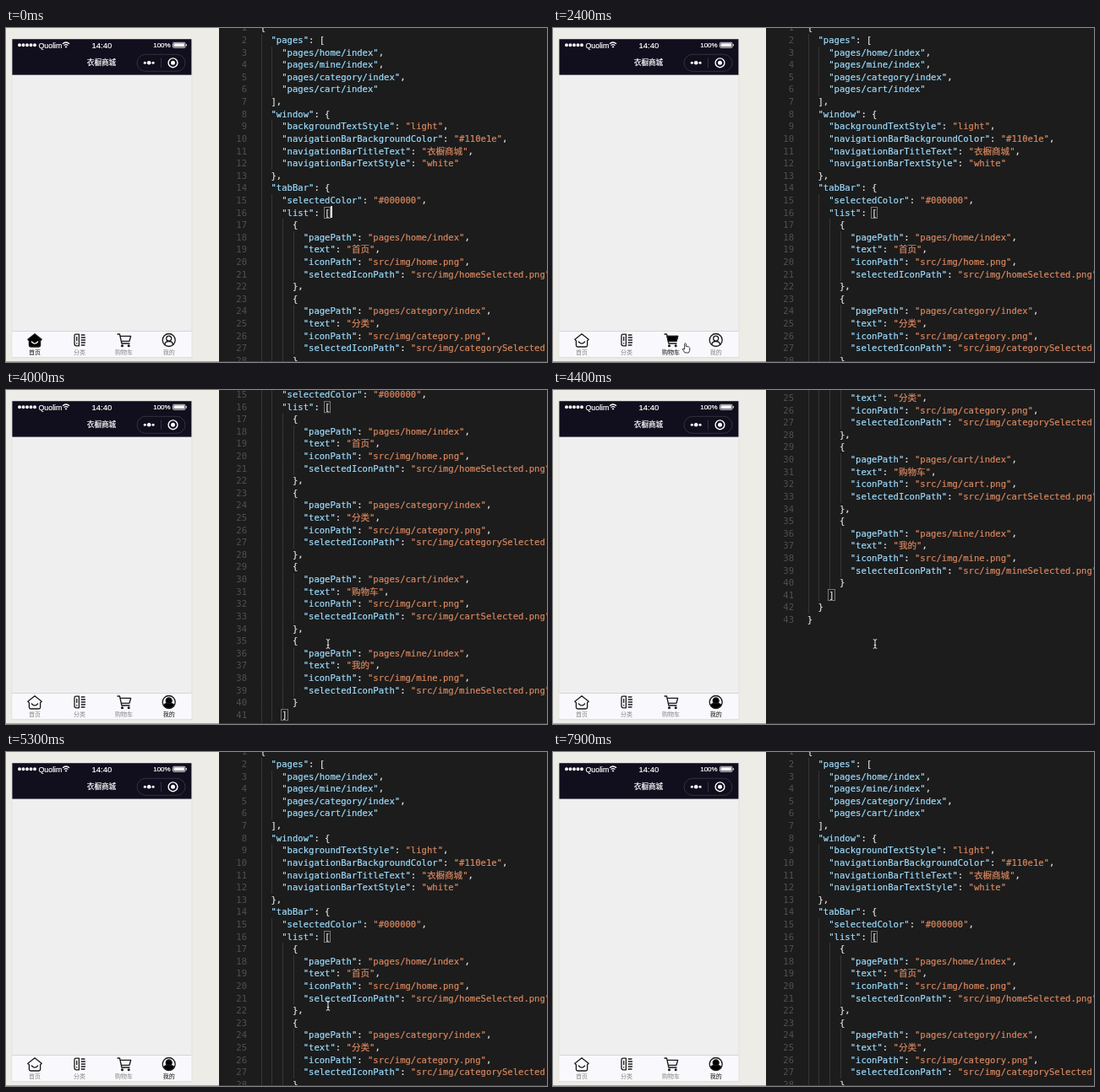
Write an HTML page that moves like this. It is 640x396 px and loops after 8000 ms.

```html
<!DOCTYPE html>
<html lang="zh">
<head>
<meta charset="utf-8">
<style>
html, body { margin: 0; width: 100%; height: 100%; overflow: hidden; background: #edece7; }
#editor { position: absolute; left: 252px; top: 0; width: 388px; height: 396px; overflow: hidden; background: #1c1c1c; }
#code { position: absolute; left: 0; top: -7.6px; width: 100%; }
.line { position: relative; height: 14.61px; font: 10.57px/14.61px "DejaVu Sans Mono", "Noto Sans CJK SC", "Noto Sans CJK", monospace; white-space: pre; color: #e0e0e0; padding-left: 48.8px; -webkit-text-stroke: .2px; }
.line b { position: absolute; right: 355px; font-weight: normal; color: #505050; -webkit-text-stroke: 0; }
.line i { position: absolute; top: 0; width: 1px; height: 15px; background: #363636; }
.key { color: #9cdcfe; }
.str { color: #d9875f; }
.match { outline: 1px solid #7a7a7a; outline-offset: -.5px; }
#caret { position: absolute; left: 132px; top: 219px; width: 1.5px; height: 14px; background: #ddd; }
svg { position: absolute; left: 0; top: 0; font-family: "Liberation Sans", "Noto Sans CJK SC", "Noto Sans CJK", sans-serif; }
.status text { stroke: #fff; stroke-width: .2; }
.tab { fill: none; stroke: #1a1a1a; stroke-width: 1.3; stroke-linejoin: round; stroke-linecap: round; }
.tab text { fill: #858585; stroke: none; font-size: 7px; text-anchor: middle; }
.tab.on text { fill: #111; font-weight: 500; }
.tab .solid, .tab.on .off { display: none; }
.tab.on .solid { display: inline; }
.fill { fill: #000; }
</style>
</head>
<body>
<div id="editor"><div id="code"></div></div>
<svg width="640" height="396" viewBox="0 0 640 396">
  <path d="M0 395.5H252" stroke="#a5a4a1"/>
  <path d="M252 395.5H640" stroke="#3a3a3a"/>
  <rect x="6.5" y="12.5" width="214" height="379" fill="#e2e1dd"/>
  <rect x="7.4" y="13" width="212" height="377" fill="#efeff0"/>
  <rect x="7.4" y="13.2" width="212" height="42.4" fill="#110e1e"/>
  <g class="status" fill="#fff">
    <path d="M16 20.3H34.2" stroke="#fff" stroke-width="3.9" stroke-linecap="round" stroke-dasharray="0 4.5"/>
    <text x="38.5" y="23.5" font-size="8.8">Quolim</text>
    <text x="113.4" y="23.6" font-size="9.5" text-anchor="middle">14:40</text>
    <text x="174.2" y="23.2" font-size="8">100%</text>
    <text x="113" y="44.2" font-size="8.6" font-weight="500" text-anchor="middle">衣橱商城</text>
    <path d="M67 18.8Q71 15.2 75 18.8M68.6 20.6Q71 18.6 73.4 20.6" fill="none" stroke="#fff" stroke-width="1.2"/>
    <path d="M69.5 22L71 23.8L72.5 22Q71 20.9 69.5 22"/>
    <rect x="197.5" y="17.3" width="14.5" height="6" rx="1" fill="none" stroke="#fff" stroke-width=".8"/>
    <path d="M198.5 18.3h12.5v4h-12.5zM212.7 19h1v2.6h-1z"/>
    <circle cx="164.3" cy="41.3" r="1.5"/><circle cx="169.2" cy="41.3" r="2.3"/><circle cx="174.1" cy="41.3" r="1.5"/>
    <circle cx="197.5" cy="41.3" r="2.5"/>
  </g>
  <g fill="none" stroke="#fff">
    <circle cx="197.5" cy="41.3" r="5.4" stroke-width="1.4"/>
    <rect x="155" y="31.3" width="57" height="20" rx="10" stroke="#3d3a48" stroke-width=".8"/>
    <path d="M183.5 35.5v11.5" stroke="#3d3a48" stroke-width=".8"/>
  </g>
  <rect x="7.4" y="359" width="212" height="31" fill="#f9f9fd"/>
  <path d="M7.4 359.5H219.4" stroke="#d5d5d9"/>

  <g class="tab" transform="translate(34 370)">
    <path class="off" d="M0-7.3L8.2-.8L6.6 .8V6.2Q6.6 8 4.8 8H-4.8Q-6.6 8-6.6 6.2V.8L-8.2-.8ZM-3.6 2Q0 6.2 3.6 2"/>
    <g class="solid"><path class="fill" d="M0-7.3L8.2-.8L6.6 .8V6.2Q6.6 8 4.8 8H-4.8Q-6.6 8-6.6 6.2V.8L-8.2-.8Z"/><path d="M-3.6 2Q0 6.2 3.6 2" stroke="#fff"/></g>
    <text y="17.4">首页</text>
  </g>
  <g class="tab" transform="translate(87 370)">
    <path d="M2.2-6H6M2.2-3H6.5M2.2 0H6.5M2.2 3H6.5M2.2 6H6"/>
    <path class="off" d="M-4.4-6.8H-.6V6.8H-3.6Q-6 6.8-6 4.4V-5.2Q-6-6.8-4.4-6.8ZM-3.3-3.6V.5M-3.3 3.7V4"/>
    <path class="solid fill" d="M-4.4-6.8H-.6V6.8H-3.6Q-6 6.8-6 4.4V-5.2Q-6-6.8-4.4-6.8Z"/>
    <text y="17.4">分类</text>
  </g>
  <g class="tab" transform="translate(139.5 370)">
    <path d="M-7.5-7H-5L-2.6 4H6.5M-4.5-4.7H8.2L6.5 1.3H-3.2"/>
    <path class="solid fill" d="M-4.5-4.7H8.2L6.5 1.3H-3.2Z"/>
    <circle class="fill" cx="-2" cy="6.8" r=".9"/><circle class="fill" cx="5.7" cy="6.8" r=".9"/>
    <text y="17.4">购物车</text>
  </g>
  <g class="tab" transform="translate(192.7 370)">
    <circle r="7.5"/>
    <path class="off" d="M-4.9 5.5Q-4.5 1.5 0 1.5T4.9 5.5"/>
    <circle class="off" cy="-1.8" r="3"/>
    <g class="solid"><circle class="fill" cy="-1.6" r="3.5"/><path class="fill" d="M-6.3 3.6Q-4.5 1.2 0 1.2T6.3 3.6Q4 7.2 0 7.2T-6.3 3.6Z"/></g>
    <text y="17.4">我的</text>
  </g>

  <g id="mouse" stroke-linejoin="round">
    <path id="hand" d="M-1.8 0V-4.6Q-.9-6-.1-4.6V-1.6Q3.6-1.6 4.4 .4Q4.6 4 3 6H-1.4L-4.2 2Q-4.3 .4-1.8 2Z" fill="#fff" stroke="#222" stroke-width=".9"/>
    <path id="beam" d="M-2.2-5.3Q0-5.3 0-4V4Q0 5.3-2.2 5.3M2.2-5.3Q0-5.3 0-4M0 4Q0 5.3 2.2 5.3M-1.2 1.5H1.2" fill="none" stroke="#eee"/>
    <path id="arrow" d="M-3-6V4.5L-.7 2.3L1 6L2.5 5.3L.9 1.7H4.3Z" fill="#111" stroke="#fff" stroke-width=".8"/>
  </g>
</svg>
<script>
const LOOP = 8000;
const $ = id => document.getElementById(id);

const tabItem = (name, text) => ({
  pagePath: `pages/${name}/index`,
  text,
  iconPath: `src/img/${name}.png`,
  selectedIconPath: `src/img/${name}Selected.png`
});
const config = {
  pages: ['home', 'mine', 'category', 'cart'].map(name => `pages/${name}/index`),
  window: {
    backgroundTextStyle: 'light',
    navigationBarBackgroundColor: '#110e1e',
    navigationBarTitleText: '衣橱商城',
    navigationBarTextStyle: 'white'
  },
  tabBar: {
    selectedColor: '#000000',
    list: [tabItem('home', '首页'), tabItem('category', '分类'), tabItem('cart', '购物车'), tabItem('mine', '我的')]
  }
};

function renderLine(line, index) {
  const number = index + 1;
  const indent = line.search(/\S/);
  let guides = '';
  for (let col = 0; col < indent; col += 2) guides += `<i style="left:${49.6 + col * 6.36}px"></i>`;
  let html = line.replace(/"[^"]*"(?=(:?))/g, (token, colon) =>
    `<span class="${colon || number < 7 ? 'key' : 'str'}">${token}</span>`);
  if (number === 16 || number === 41) html = html.replace(/[[\]]/, '<span class="match">$&</span>');
  return `<div class="line"><b>${number}</b>${guides}${html}</div>`;
}
$('code').innerHTML = JSON.stringify(config, null, 2).split('\n').map(renderLine).join('') + '<div id="caret"></div>';

const ease = (t, from, to) => {
  const u = Math.min(1, Math.max(0, (t - from) / (to - from)));
  return (1 - Math.cos(Math.PI * u)) / 2;
};

// Pointer stops: time, x, y
const stops = [
  [100, 383, 219], [800, 98, 379], [1500, 98, 379], [1900, 150, 379], [2300, 150, 379],
  [2700, 200, 379], [3000, 200, 379], [3500, 381, 301], [6400, 381, 301], [7200, 470, 410]
];
function pointerAt(t) {
  let [, x, y] = stops[0];
  for (let i = 1; i < stops.length; i++) {
    const [from, x0, y0] = stops[i - 1], [to, x1, y1] = stops[i];
    const k = ease(t, from, to);
    x += (x1 - x0) * k;
    y += (y1 - y0) * k;
  }
  return [x, y];
}

const tabs = document.querySelectorAll('.tab');
const show = (id, visible) => $(id).style.display = visible ? '' : 'none';

function draw(t) {
  const scroll = 341 * (ease(t, 3600, 4325) - ease(t, 4550, 5200));
  $('code').style.transform = `translateY(${-scroll}px)`;
  show('caret', t < 500);

  const selected = [1000, 2000, 2800].filter(time => t >= time).length;
  tabs.forEach((tab, i) => tab.classList.toggle('on', i === selected));

  const [x, y] = pointerAt(t);
  const overCode = x > 252, overTabs = x < 219 && y > 359;
  $('mouse').setAttribute('transform', `translate(${x} ${y})`);
  show('mouse', t >= 100);
  show('beam', overCode);
  show('hand', overTabs);
  show('arrow', !overCode && !overTabs);
}

const start = performance.now();
function tick() {
  draw((performance.now() - start) % LOOP);
  requestAnimationFrame(tick);
}
tick();
</script>
</body>
</html>
```
